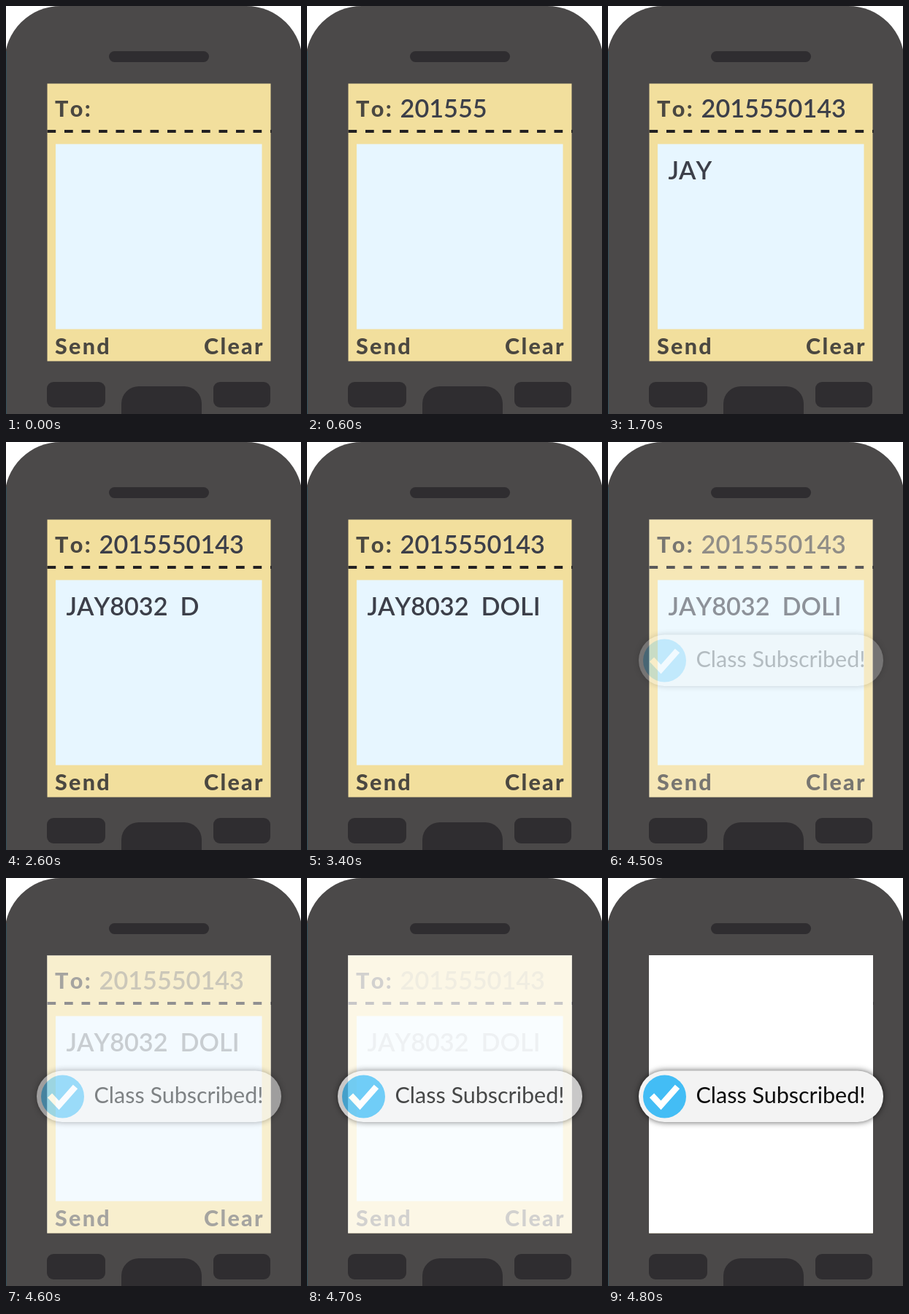
Animation, 404 px wide and 560 px high, one loop 6800 ms. Source, as an HTML page with a canvas:

```html
<!DOCTYPE html>
<html lang="en">
<head>
<meta charset="utf-8">
<title>Text message subscription</title>
<style>
  html, body { margin: 0; width: 100%; height: 100%; overflow: hidden; background: #fff; }
  canvas { position: absolute; left: 0; top: 0; }
</style>
</head>
<body>
<canvas id="phone" width="404" height="560"></canvas>
<canvas id="toast" width="404" height="560"></canvas>
<script>
const LOOP = 6800, STEP = 100;
const NUMBER = '2015550143', CODE = 'JAY8032', NAME = 'DOLI';
const toast = document.getElementById('toast');
const phoneCtx = document.getElementById('phone').getContext('2d');
const toastCtx = toast.getContext('2d');

const clamp = v => Math.max(0, Math.min(1, v));

function box(c, x, y, w, h, r, color) {
  c.fillStyle = color;
  c.beginPath();
  c.roundRect(x, y, w, h, r);
  c.fill();
}

function disc(c, x, y, r, color) {
  c.fillStyle = color;
  c.beginPath();
  c.arc(x, y, r, 0, Math.PI * 2);
  c.fill();
}

function write(c, text, x, y, font, color, spacing = 0, kerning = 'none') {
  c.font = font + ' Lato, sans-serif';
  c.letterSpacing = spacing + 'px';
  c.fontKerning = kerning;
  c.fillStyle = color;
  c.fillText(text, x, y);
}

// Part of the text typed so far, one letter per step
function typed(text, start, t) {
  return text.slice(0, Math.max(0, Math.floor((t - start) / STEP) + 1));
}

function drawBody(c) {
  box(c, -2, 0, 408, 700, 77, '#4b4949');
  c.fillStyle = '#34505b';
  c.fillRect(0, 62, 1, 498);

  const dark = '#2f2d30';
  box(c, 141, 62, 137, 15, 7.5, dark);
  box(c, 56, 516, 80, 35, 9, dark);
  box(c, 284, 516, 78, 35, 9, dark);
  box(c, 158, 522, 110, 80, 24, dark);
}

function drawScreen(c) {
  c.filter = 'blur(0.5px)';
  c.fillStyle = '#f2df9d';
  c.fillRect(56.5, 106.5, 306, 381);
  c.fillStyle = '#e7f6ff';
  c.fillRect(68, 189.5, 282.5, 254);

  c.strokeStyle = '#232122';
  c.lineWidth = 4;
  c.setLineDash([11.7, 11.8]);
  c.beginPath();
  c.moveTo(56.5, 172);
  c.lineTo(363.5, 172);
  c.stroke();
  c.setLineDash([]);

  const label = (text, x, y) => write(c, text, x, y, '800 30.5px', '#4b4841', 2.3);
  label('To:', 67, 152);
  label('Send', 67, 478);
  label('Clear', 271, 478);
  c.filter = 'none';
}

function drawMessage(c, t) {
  const entry = (text, x, y) => write(c, text, x, y, '600 34.2px', '#3c3f49');
  entry(typed(NUMBER, 100, t), 127.6, 153);
  entry(typed(CODE, 1500, t), 82.4, 238);
  entry(typed(NAME, 2600, t), 238.5, 238);
}

function drawTap(c, t) {
  const k = (t - 3400) / 600;
  if (k <= 0 || k >= 1) return;
  c.globalAlpha = 0.35 * (1 - k);
  disc(c, 104, 470, 40 * Math.sin(k * Math.PI / 2), '#4b4949');
  c.globalAlpha = 1;
}

function drawToast(c) {
  c.shadowColor = 'rgba(0,0,0,.65)';
  c.shadowBlur = 9;
  box(c, 42, 264.5, 335, 70.5, 35.25, '#f3f3f3');
  c.shadowColor = 'transparent';
  disc(c, 77.5, 300, 29.5, '#43bdf5');

  c.strokeStyle = '#fff';
  c.lineWidth = 8.5;
  c.beginPath();
  c.moveTo(60, 298.5);
  c.lineTo(72.5, 312);
  c.lineTo(95, 286.5);
  c.stroke();
  write(c, 'Class Subscribed!', 120.5, 309, '400 30.5px', '#0c0c0c', 0, 'normal');
}

function frame(now) {
  const t = Math.floor((now % LOOP) / STEP) * STEP;
  const fade = clamp((t - 4400) / 400);
  const c = phoneCtx;
  c.clearRect(0, 0, 404, 560);
  drawBody(c);
  drawScreen(c);
  c.globalAlpha = 1 - fade;
  drawMessage(c, t);
  c.globalAlpha = 1;
  drawTap(c, t);
  c.globalAlpha = fade;
  c.fillStyle = '#fff';
  c.fillRect(56, 106, 307, 381.5);
  c.globalAlpha = 1;
  toast.style.opacity = fade;
}

const start = performance.now();
function tick() {
  frame(performance.now() - start);
  requestAnimationFrame(tick);
}
drawToast(toastCtx);
tick();
</script>
</body>
</html>
```
